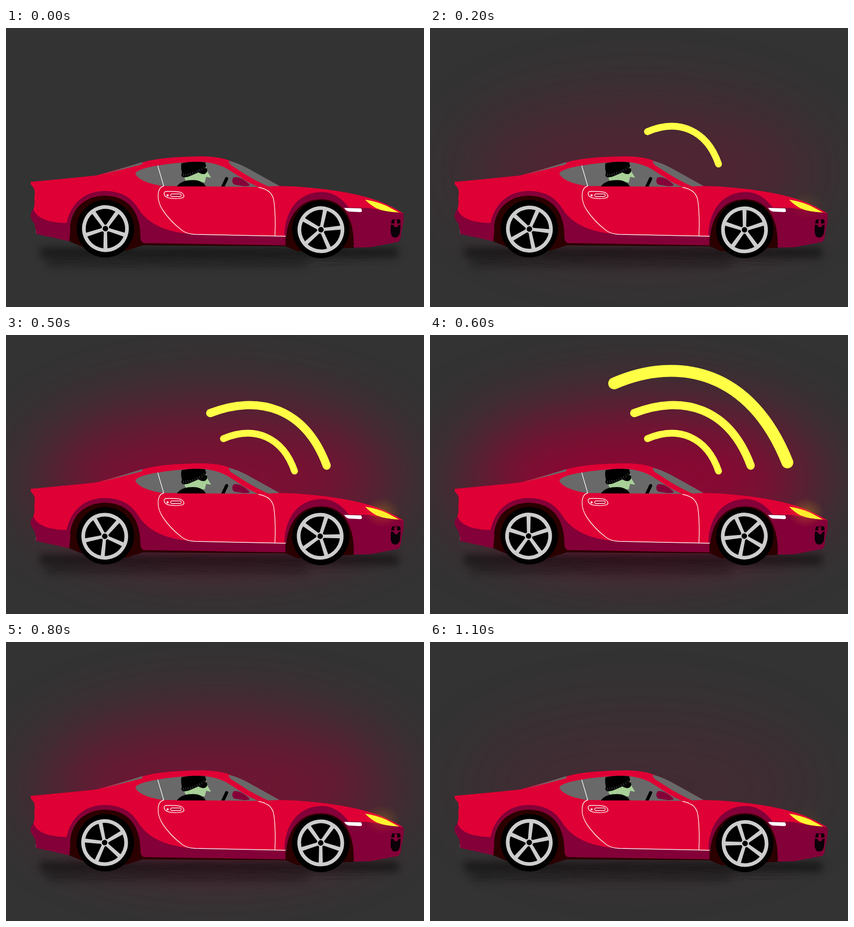
An HTML page with a canvas for the animation above (1.2 s loop, 917x611 px).

```html
<!DOCTYPE html>
<html lang="en">
<head>
<meta charset="utf-8">
<title>Getaway car</title>
<style>
html, body { margin: 0; width: 100%; height: 100%; overflow: hidden; background: #333; }
canvas { display: block; }
</style>
</head>
<body>
<canvas id="stage" width="917" height="611"></canvas>
<script>
const W = 917, H = 611, STEP = 100, STEPS = 12;
const RED = '#df0035', MAROON = '#840038', SHADE = '#2b0000';
const GLASS = '#696969', RIM = '#cdcdcd', YELLOW = '#ffff46';
const ctx = document.getElementById('stage').getContext('2d');

function layer(draw) {
  const c = document.createElement('canvas');
  c.width = W;
  c.height = H;
  draw(c.getContext('2d'));
  return c;
}

function fill(g, color, d) {
  g.fillStyle = color;
  g.fill(new Path2D(d));
}

function line(g, color, width, d) {
  g.strokeStyle = color;
  g.lineWidth = width;
  g.lineCap = g.lineJoin = 'round';
  g.stroke(new Path2D(d));
}

function disc(g, color, x, y, r) {
  g.fillStyle = color;
  g.beginPath();
  g.arc(x, y, r, 0, Math.PI * 2);
  g.fill();
}

function drawAlarm(g) {
  g.filter = 'blur(80px)';
  g.fillStyle = 'rgb(142,6,51)';
  g.beginPath();
  g.ellipse(462, 314, 385, 150, 0, 0, Math.PI * 2);
  g.fill();
}

function drawBeam(g) {
  g.translate(825, 389);
  g.scale(40, 32);
  const grad = g.createRadialGradient(0, 0, 0, 0, 0, 1);
  grad.addColorStop(0, 'rgba(255,190,20,0.3)');
  grad.addColorStop(0.5, 'rgba(255,190,20,0.14)');
  grad.addColorStop(1, 'rgba(255,190,20,0)');
  g.fillStyle = grad;
  g.fillRect(-1, -1, 2, 2);
}

function drawShadow(g) {
  let seed = 7;
  const rand = () => (seed = (seed * 16807) % 2147483647) / 2147483647;
  g.filter = 'blur(9px)';
  g.fillStyle = 'rgba(0,0,0,0.5)';
  g.fillRect(75, 481, 785, 22);
  g.fillStyle = 'rgba(0,0,0,0.27)';
  g.fillRect(90, 504, 570, 20);
  g.filter = 'none';
  for (let i = 0; i < 500; i++) {
    const x = 80 + 700 * rand(), y = 480 + 44 * rand();
    g.fillStyle = `rgba(0,0,0,${0.12 * rand()})`;
    g.fillRect(x, y, 10 + 45 * rand(), 1);
  }
}

function drawDriver(g) {
  g.save();
  g.clip(new Path2D('M340 293H500V347H340Z'));
  fill(g, '#a8d098', 'M389 322L394 334L410 338H436L439 326L450 328L441 313L438 299L420 310Z');
  fill(g, '#000', 'M374 348C382 336 396 333 410 333C424 333 434 338 439 348Z');
  fill(g, '#000', 'M385 296Q410 291 437 294L439 302Q438 309 430 313L409 322Q394 329 387 326Q383 324 386 317Q383 306 385 296Z');
  fill(g, '#000', 'M420 313Q432 302 441 308Q443 318 434 320Q424 320 420 313Z');
  for (let i = 0; i < 10; i++) {
    const x = 389 + i * 5, y = 319 - i * i * 0.2 + 0.3;
    line(g, '#777', 0.7, `M${x} ${y}l${1 + i * 0.1} 5`);
  }
  line(g, '#000', 7, 'M475 349L484 330');
  g.restore();
}

function drawBody(g) {
  // wheel wells and underside
  fill(g, SHADE, 'M138 467C136 405 164 365 217 365C272 365 299 408 300 470L613 474C607 420 635 373 690 373C744 373 766 420 765 481L640 489L613 478L300 476L262 488L170 480Z');
  g.fillStyle = GLASS;
  g.fillRect(65, 442, 3, 8);

  // upper shell, cut out around the wheels
  fill(g, RED, `M54 337Q130 330 198 323L300 294Q340 282 430 281Q470 282 489 290Q512 297 600 346
    Q665 347 730 357.5Q782 366 818 379Q846 390 872 406L862 410L752 400
    C740 380 716 375 690 375C642 375 614 412 614 457L415 453L300 440
    C292 400 264 367 217 367C172 367 143 398 141 430L68 424L60 398Q64 385 62 374Q65 357 60 349Q53 343 54 337Z`);

  // rear bumper, flare and sill
  fill(g, MAROON, `M60 397Q66 414 92 422Q112 427 133 427C139 398 160 359 213 357
    C254 356 275 373 288 392C305 420 336 447 415 452L613 457V476L303 471
    Q296 470 295 460C296 406 270 367 217 367C165 367 138 405 141 440L139 467L66 451
    Q66 438 62 428Q51 416 55 405Z`);
  // front flare and bumper
  fill(g, MAROON, `M611 456C611 407 636 359 695 359C724 361 740 378 752 393L794 394Q832 401 872 406
    Q874 416 870 436Q867 444 866 458L862 468L800 480L763 481C765 418 741 375 690 375C647 375 619 409 615 456Z`);

  // glass
  fill(g, GLASS, 'M207 322L298 294Q302 295 297 299L250 311Z');
  fill(g, GLASS, 'M489 291Q505 294 530 307L600 346L575 347Q544 333 518 316L493 300Q487 293 489 291Z');
  fill(g, GLASS, 'M284 318Q290 308 334 301Q384 293 430 293Q465 296 488 310L530 337L553 348L345 346Q308 341 291 328Q284 322 284 318Z');
  drawDriver(g);
  fill(g, MAROON, 'M499 327Q508 325 517 330Q529 337 535 344Q532 347 520 346L501 343Q493 337 499 327Z');

  // door seams
  line(g, '#fff', 1.4, 'M333 302L346 346C331 350 329 376 344 399C358 420 373 433 386 443Q396 451 415 452L613 456');
  line(g, '#fff', 1.4, 'M554 349C576 353 586 363 588 381Q592 412 590 455');
  line(g, '#fff', 1.4, 'M350 358Q370 357 384 360Q392 365 390 370Q385 375 362 373Q346 371 347 361Q348 359 350 358Z');
  line(g, '#fff', 1.3, 'M363 363.5H383Q386 366 383 369H363Q359 366 363 363.5Z');
  line(g, '#6f001f', 1.5, 'M364 366.3H382');
  disc(g, '#fff', 354.5, 366.5, 2.3);

  // lights and grille
  fill(g, '#fffc32', 'M788 376Q812 379.5 834 389L862 404Q832 403 813 395Q798 387 788 376Z');
  fill(g, '#fff', 'M742 394L779 395L781 400Q780 404 775 403L752 402Q745 400 742 394Z');
  fill(g, '#0a0008', 'M849 419H852V428H845Q845 421 849 419ZM858 419H863Q867 422 865 428H858ZM844 431H850Q852 438 858 436Q861 434 861 431H866L864 450Q861 459 853 459Q846 459 844 448Z');
  line(g, '#0a0008', 1, 'M852 421Q855 418 858 421');
}

function drawWheel(tx, ty, px, py, dx, dy, phase, turn) {
  disc(ctx, '#000', tx, ty, 63);
  ctx.save();
  ctx.translate(px, py);
  ctx.rotate(turn);
  ctx.translate(dx, dy);
  ctx.rotate(phase * Math.PI / 180);
  ctx.strokeStyle = RIM;
  ctx.lineWidth = 8;
  ctx.beginPath();
  ctx.arc(0, 0, 47.2, 0, Math.PI * 2);
  ctx.stroke();
  ctx.fillStyle = RIM;
  for (let i = 0; i < 5; i++) {
    ctx.beginPath();
    ctx.moveTo(3, -3.5);
    ctx.lineTo(47, -4.5);
    ctx.lineTo(47, 4.5);
    ctx.lineTo(3, 3.5);
    ctx.fill();
    ctx.rotate(Math.PI * 0.4);
  }
  disc(ctx, RIM, 0, 0, 8.5);
  disc(ctx, '#000', 0, 0, 6);
  ctx.restore();
}

const shadow = layer(drawShadow);
const body = layer(drawBody);
const alarm = layer(drawAlarm);
const beam = layer(drawBeam);

const waves = [
  [15, 'M477 227C545 198 607 223 633 298'],
  [18, 'M448 171C553 130 656 158 703.5 286'],
  [26, 'M404 106C545 45 704 78 784 279']
];

function draw(step) {
  const glow = 1 - Math.abs(step - 6) / 6;
  const turn = step * Math.PI * 2 / STEPS;
  ctx.fillStyle = '#333';
  ctx.fillRect(0, 0, W, H);
  ctx.globalAlpha = glow;
  ctx.drawImage(alarm, 0, 0);
  ctx.globalAlpha = 1;
  ctx.drawImage(shadow, 0, 0);
  ctx.drawImage(body, 0, 0);
  drawWheel(218, 439.5, 217.2, 439.8, 0.9, -0.5, 18, turn);
  drawWheel(690.5, 441, 690.2, 441, 0.7, 0.7, 66, turn);
  ctx.globalAlpha = glow;
  ctx.drawImage(beam, 0, 0);
  ctx.globalAlpha = 1;
  const count = step < 8 ? Math.floor(step / 2) : 0;
  for (const [width, d] of waves.slice(0, count)) line(ctx, YELLOW, width, d);
}

const start = performance.now();
function tick(now) {
  draw(Math.floor(Math.max(0, now - start) / STEP) % STEPS);
  requestAnimationFrame(tick);
}
draw(0);
requestAnimationFrame(tick);
</script>
</body>
</html>
```
